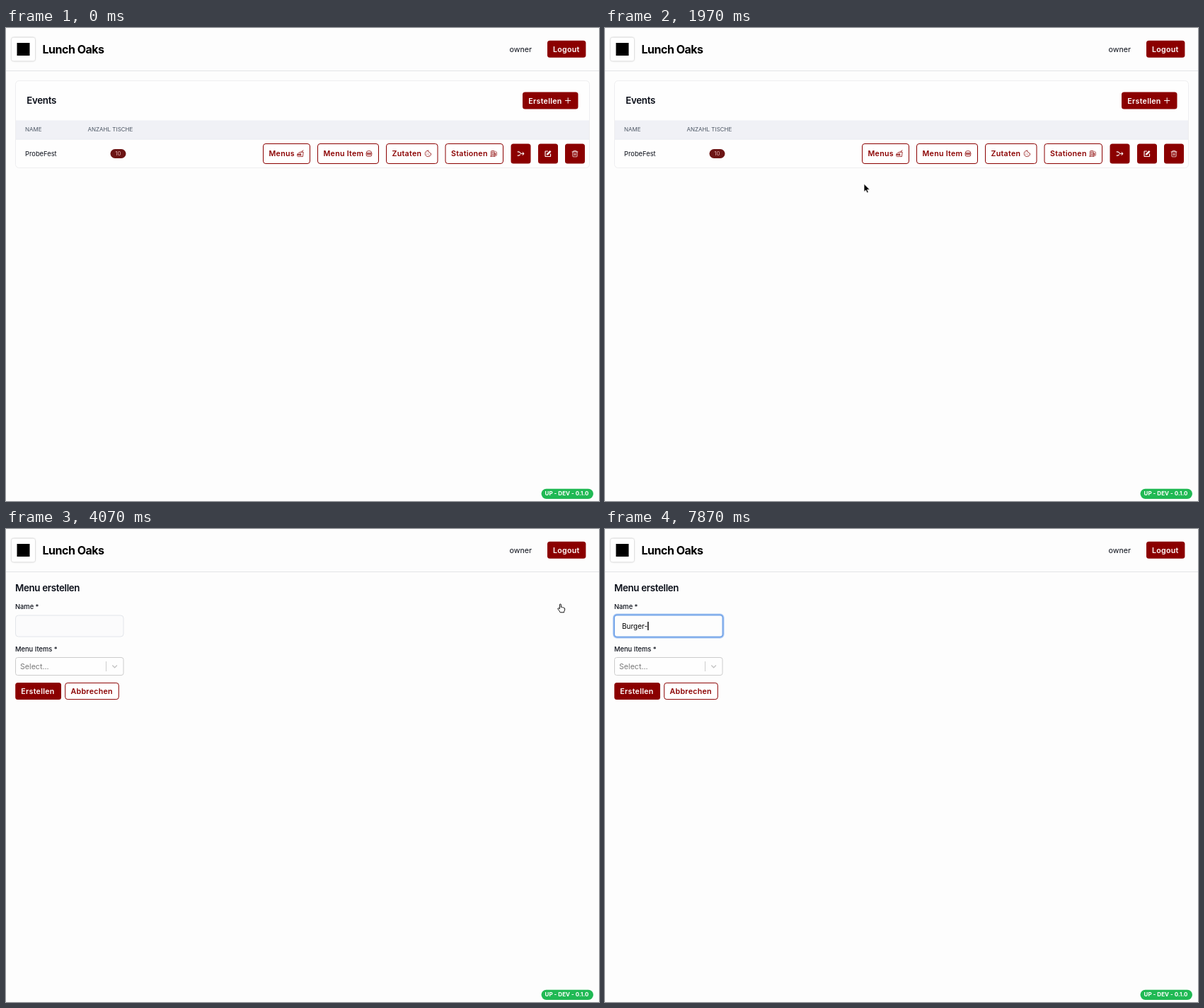
These frames come from a looping animation (838x668 px, 8000 ms). An HTML page:

```html
<!DOCTYPE html>
<html lang="de">
<head>
<meta charset="utf-8">
<title>Menu erstellen</title>
<style>
html, body { margin: 0; width: 100%; height: 100%; overflow: hidden; background: #fdfdfd; }
svg { display: block; }
#stage { width: 838px; height: 668px; font-family: Inter, sans-serif; fill: #0b0f19; }
.title { font-size: 16px; font-weight: 700; letter-spacing: -.5px; fill: #000; }
.h2 { font-size: 13.33px; font-weight: 600; letter-spacing: -.33px; }
.base { font-size: 10.67px; }
.small { font-size: 9.33px; }
.label { font-size: 9.33px; font-weight: 500; }
.th { font-size: 8px; fill: #4b5563; }
.btn { font-size: 10.67px; font-weight: 600; letter-spacing: .27px; }
.red { fill: #8b0000; }
.white { fill: #fff; }
.line { fill: none; stroke: currentColor; stroke-width: 1.8; stroke-linecap: round; stroke-linejoin: round; }
.solid { fill: #8b0000; }
.outline { fill: #fff; stroke: #8b0000; }
.card { fill: #fefefe; stroke: #eeeef0; }
#hover { filter: drop-shadow(0 2px 2px #0006); }
#logo { filter: drop-shadow(0 .7px 1px #0005); }
#typed { font-size: 10px; fill: #000; }
</style>
</head>
<body>
<svg id="stage" viewBox="0 0 838 668">
  <defs>
    <symbol id="meal" viewBox="0 0 24 24"><path class="line" d="M2 14q1-4 6-4t6 4zM1.500 17h13M2 20q0 2 2 2h8q2 0 2-2M10 7h12l-2 15h-5M17 7l1-4 4-1.500"/></symbol>
    <symbol id="burger" viewBox="0 0 24 24"><path class="line" d="M3 9q0-6 9-6t9 6zM2 13h20M3 16.500q0 4.500 4 4.500h10q4 0 4-4.500z"/></symbol>
    <symbol id="cookie" viewBox="0 0 24 24"><path class="line" d="M12 2a10 10 0 1 0 10 10q-4 0-5-4-5 0-5-6zM8 9v.1M8 15v.1M13 13v.1M15 17v.1"/></symbol>
    <symbol id="station" viewBox="0 0 24 24"><path class="line" d="M4 21V5q0-2 2-2h7q2 0 2 2v16M2 21h15M7 7h5M7 11h5M8 14v4M12 14v4M15 11h3v6q0 2 2 2t2-2V8l-4-4"/></symbol>
    <symbol id="merge" viewBox="0 0 24 24"><path class="line" style="stroke-width:2.400" d="M2 6h3q3 0 5 3t5 3h7M18 8l4 4-4 4M2 18h3q3 0 5-3"/></symbol>
    <symbol id="edit" viewBox="0 0 24 24"><path class="line" style="stroke-width:2.600" d="M11 4H4q-1 0-1 1v15q0 1 1 1h15q1 0 1-1v-7"/><path fill="currentColor" d="M8 12 18 2l4 4-10 10-5 1z"/></symbol>
    <symbol id="trash" viewBox="0 0 24 24"><path class="line" d="M3 6h18M8 6V2.500h8V6M5 6v14q0 2 2 2h10q2 0 2-2V6M10 11v6M14 11v6"/></symbol>
    <symbol id="plus" viewBox="0 0 24 24"><path class="line" style="stroke-width:2.600" d="M12 2v20M2 12h20"/></symbol>
  </defs>

  <path d="M0 60.500h838" stroke="#e3e4e7"/>
  <g id="logo"><rect x="8" y="13.500" width="33" height="33" rx="3" fill="#fff"/></g>
  <rect x="15.500" y="21" width="18" height="18" fill="#000"/>
  <text class="title" x="51.500" y="35.800">Lunch Oaks</text>
  <text class="base" x="711.500" y="33.900">owner</text>
  <rect class="solid" x="765" y="17.700" width="54.400" height="24" rx="3.500"/>
  <text class="btn white" x="773" y="33.700">Logout</text>

  <g id="panel">
    <rect id="card" class="card" x="13.500" y="74.500" width="811" height="123" rx="5"/>
    <path d="M14 130.500h810v26H14z" fill="#f0f1f6"/>
    <path d="M14 157h810" stroke="#e4e7ee"/>
    <rect class="solid" x="730" y="90.500" width="78.500" height="24" rx="3.500"/>
    <text class="btn white" x="738.300" y="106.500">Erstellen</text>
    <use href="#plus" x="789.700" y="98" width="9" height="9" color="#fff"/>
    <text class="th" x="27" y="146.200">NAME</text>
  </g>

  <g id="events">
    <text class="h2" x="29.300" y="107.200">Events</text>
    <text class="th" x="115.500" y="146.200">ANZAHL TISCHE</text>
    <text class="small" x="27" y="180.700">ProbeFest</text>
    <rect x="147.500" y="171" width="22" height="13" rx="6.500" fill="#6c1515"/>
    <text x="158.500" y="180.400" text-anchor="middle" font-size="8" fill="#dfa9a9">10</text>
    <g id="hover"><rect class="outline" x="363.500" y="163.500" width="66" height="28" rx="3.500"/></g>
    <g id="actions"></g>
  </g>

  <g id="menus">
    <rect class="solid" x="29.500" y="90.500" width="28" height="24" rx="3.500"/>
    <path d="M45 99.500l-3 3 3 3" fill="none" stroke="#fff" stroke-width="1.200"/>
    <text class="h2" x="68" y="107.200">Menus</text>
    <use href="#meal" x="119.500" y="96.500" width="13" height="13" color="#0b0f19"/>
    <text class="th" x="300" y="146.200">PREIS</text>
    <text class="th" x="507.500" y="146.200">MENU ITEMS</text>
    <text class="small" x="130.700" y="175.300">No Items</text>
  </g>

  <g id="form">
    <text class="h2" x="13" y="88.200">Menu erstellen</text>
    <text class="label" x="13" y="113.200">Name *</text>
    <rect x="13.500" y="122" width="152.500" height="30" rx="4" fill="#fbfbfc" stroke="#e2e5ea"/>
    <g id="focus">
      <rect x="12.500" y="121" width="154.500" height="32" rx="4.500" fill="none" stroke="#c6dbf8" stroke-width="3.400"/>
      <rect x="12.900" y="121.400" width="153.700" height="31.200" rx="4" fill="#fdfdfd" stroke="#7ba9ea" stroke-width="2.200"/>
    </g>
    <text id="typed" x="24" y="140.700"></text>
    <rect id="caret" y="131" width="1.400" height="12" fill="#000"/>
    <text class="label" x="13" y="172.700">Menu Items *</text>
    <rect x="13.500" y="181.500" width="152.500" height="25" rx="3" fill="#fefefe" stroke="#ccc"/>
    <text class="base" x="20" y="197.900" fill="#7b7b7b">Select...</text>
    <path d="M141.500 187v14" stroke="#ccc"/>
    <path d="M150.300 192.500l3.300 3.300 3.300-3.300" fill="none" stroke="#c4c4c4" stroke-width="1.300"/>
    <rect class="solid" x="13.200" y="217" width="64.800" height="24" rx="3.500"/>
    <text class="btn white" x="21.300" y="232.900">Erstellen</text>
    <rect class="outline" x="83.700" y="217.400" width="75.600" height="23.200" rx="3.500"/>
    <text class="btn red" x="91.500" y="232.900">Abbrechen</text>
  </g>

  <rect x="756.500" y="650.700" width="73.500" height="14.300" rx="7.150" fill="#20b954"/>
  <text class="white" x="761.500" y="660.300" font-size="8" font-weight="700" letter-spacing=".05">UP - DEV - 0.1.0</text>

  <g id="pointer">
    <path id="arrow" d="M0 0v11l2.600-2.300 1.700 3.800 1.900-.8-1.700-3.700h3.600z" fill="#000" stroke="#fff" stroke-width=".7"/>
    <path id="hand" d="M-1.600 1q0-1 1-1t1 1v3.500q1.300-.7 2 .3 1.300-.4 1.800.6 1.600 0 1.500 1.700 0 2-1.100 3.400v1.300h-5.400Q-2 9.500-3.900 7.200q-.6-1 .2-1.400t2.100 1z" fill="#fff" stroke="#111" stroke-width="1"/>
    <path id="beam" d="M-2.300-5Q0-5 0-3.500V3.500Q0 5-2.300 5M2.300-5Q0-5 0-3.500M0 3.500Q0 5 2.300 5M-1.200 1.700h2.400" fill="none" stroke="#111"/>
  </g>
</svg>
<script>
const LOOP = 8000;
const MENUS = 2850, FORM = 4000, FOCUS = 4930;
const word = 'Burger-';
const keys = [5870, 5970, 6070, 6200, 6400, 6500, 7870];
// time, x, y of the pointer hotspot
const path = [
  [250, 285, 680], [1150, 337, 272], [1500, 337, 272], [2350, 387, 183],
  [2900, 387, 183], [3430, 777, 147], [3720, 784, 106], [4270, 784, 106], [4900, 67, 135]
];
const $ = id => document.getElementById(id);
const show = (id, on) => { $(id).style.display = on ? '' : 'none'; };
const clamp = v => Math.min(1, Math.max(0, v));

const outlined = [
  [363.5, 66, 'Menus', 'meal'], [440.5, 86, 'Menu Item', 'burger'],
  [537.5, 72.5, 'Zutaten', 'cookie'], [621, 81.5, 'Stationen', 'station']
];
const square = [[713.5, 'merge'], [752, 'edit'], [790, 'trash']];
const icon = (name, x, y, size, color) =>
  `<use href="#${name}" x="${x}" y="${y}" width="${size}" height="${size}" color="${color}"/>`;
$('actions').innerHTML =
  outlined.map(([x, w, label, name]) =>
    `<rect class="outline" x="${x}" y="163.5" width="${w}" height="28" rx="3.5"/>
     <text class="btn red" x="${x + 8}" y="181.2">${label}</text>` +
    icon(name, x + w - 18.7, 172.2, 10.3, '#8b0000')).join('') +
  square.map(([x, name]) =>
    `<rect class="solid" x="${x}" y="163.5" width="28" height="28" rx="3.5"/>` +
    icon(name, x + 8.7, 172.2, 10.6, '#fff')).join('');

function pointerAt(t) {
  const i = path.findIndex(p => p[0] > t);
  if (i < 0) return path[path.length - 1].slice(1);
  if (i === 0) return path[0].slice(1);
  const [t0, x0, y0] = path[i - 1], [t1, x1, y1] = path[i];
  const u = (t - t0) / (t1 - t0), e = u * u * (3 - 2 * u);
  return [x0 + (x1 - x0) * e, y0 + (y1 - y0) * e];
}

// solid after each key, then fades out and back in
function caretAlpha(since) {
  if (since < 440) return 1;
  const p = (since - 440) % 900;
  return p < 400 ? 1 - clamp(p / 100) : clamp((p - 400) / 100);
}

function draw(t) {
  show('panel', t < FORM);
  show('events', t < MENUS);
  show('menus', t >= MENUS && t < FORM);
  show('form', t >= FORM);
  $('card').setAttribute('height', t < MENUS ? 123 : 112);

  const [x, y] = pointerAt(t);
  show('hover', x > 363 && y < 191.5);
  $('pointer').setAttribute('transform', `translate(${x} ${y})`);
  show('pointer', t < keys[0]);
  const hand = t > 3650 && t < 4300;
  const beam = t >= FORM && x < 166;
  show('hand', hand);
  show('beam', beam);
  show('arrow', !hand && !beam);

  show('focus', t >= FOCUS);
  show('caret', t >= FOCUS);
  const count = keys.filter(k => k <= t).length;
  const typed = $('typed');
  typed.textContent = word.slice(0, count);
  const width = count ? typed.getComputedTextLength() : 0;
  $('caret').setAttribute('x', 24.2 + width);
  $('caret').setAttribute('opacity', caretAlpha(t - (count ? keys[count - 1] : FOCUS)));
}

const start = performance.now();
function tick() {
  draw((performance.now() - start) % LOOP);
  requestAnimationFrame(tick);
}
tick();
</script>
</body>
</html>
```
